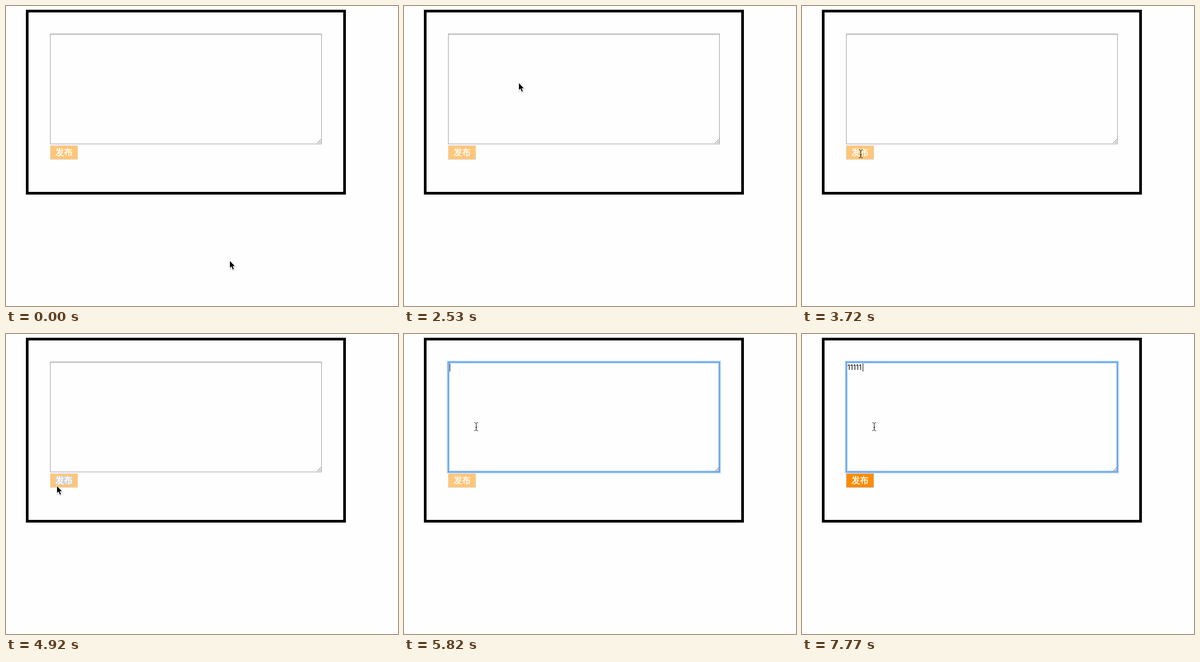
These frames come from a looping animation (730x560 px, 8 s). An HTML page:

```html
<!DOCTYPE html>
<html lang="zh">
<head>
<meta charset="utf-8">
<style>
  html, body { margin: 0; width: 100%; height: 100%; overflow: hidden; background: #fefefe; }
  svg { display: block; }
  .label { font: 500 16px "Noto Sans CJK SC", "Noto Sans CJK", sans-serif; fill: #fff; stroke: #fff; stroke-width: .4px; }
  .typed { font: 13px Inter, sans-serif; fill: #000; }
</style>
</head>
<body>
<svg width="730" height="560" viewBox="0 0 730 560" fill="none">
  <defs>
    <rect id="box" x="82.5" y="52.5" width="505" height="205"/>
    <path id="head" d="M0 0V12.8L2.9 10.1L5.2 15.8L7.3 14.9L5 9.4H9Z"/>
  </defs>
  <rect x="39.5" y="9.5" width="591" height="340" stroke="#000" stroke-width="5"/>

  <use href="#box" stroke="#a0a0a0"/>
  <path d="M82 52.5H588" stroke="#767676"/>
  <path d="M579.5 256l7-7M583.5 256l3-3" stroke="#555"/>
  <g id="ring" stroke="#4a96e8">
    <use href="#box" stroke-width="7" opacity=".1"/>
    <use href="#box" stroke-width="5" opacity=".2"/>
    <use href="#box" stroke-width="3" opacity=".5"/>
    <use href="#box"/>
  </g>
  <text id="typed" class="typed" x="84.5" y="67"></text>
  <path id="caret" d="M0 55V70" stroke="#000"/>

  <rect id="button" x="82.5" y="260.5" width="51" height="26"/>
  <rect id="selection" x="92" y="265" width="32" height="16" fill="#d4d0cd"/>
  <text class="label" x="92" y="279">发布</text>

  <g id="arrow">
    <use href="#head" x=".3" y="1.2" stroke="#000" stroke-width="3" opacity=".14"/>
    <use href="#head" stroke="#fff" stroke-width="2"/>
    <use href="#head" fill="#000"/>
  </g>
  <path id="beam" d="M-3 -7.5H-1.5L.5 -6L2.5 -7.5H4M.5 -6.5V6.5M-3 7.5H-1.5L.5 6L2.5 7.5H4M-1 1.5H2" stroke="#111"/>
</svg>
<script>
const LOOP = 8000;
const STEP = 150;
const SELECT_AT = 4170, FOCUS_AT = 5820, CARET_OFF_AT = 6270, TYPE_AT = 6870;
const CHAR_WIDTH = 5.7;

const el = id => document.getElementById(id);
const [ring, typed, caret, button, selection, arrow, beam] =
  ["ring", "typed", "caret", "button", "selection", "arrow", "beam"].map(el);

// Pointer moves: first step, last step, destination
const start = { x: 417, y: 476 };
const moves = [
  { from: 300, to: 880, x: 249, y: 155 },
  { from: 2530, to: 2680, x: 178, y: 133 },
  { from: 3120, to: 3720, x: 109, y: 276, beam: true },
  { from: 4620, to: 4920, x: 95, y: 284 },
  { from: 5370, to: FOCUS_AT, x: 134, y: 173, beam: true }
];

const ease = p => p * p * (3 - 2 * p);

function pointerAt(t) {
  const i = moves.findLastIndex(m => m.from <= t);
  if (i < 0) return start;
  const move = moves[i], origin = moves[i - 1] || start;
  if (t >= move.to) return move;
  const steps = Math.round((move.to - move.from) / STEP) + 1;
  const p = ease((Math.floor((t - move.from) / STEP) + 1) / steps);
  return {
    x: Math.round(origin.x + (move.x - origin.x) * p),
    y: Math.round(origin.y + (move.y - origin.y) * p)
  };
}

// Two characters in every three steps, five in all
function typedCount(t) {
  const steps = Math.floor((t - TYPE_AT) / STEP) + 1;
  return Math.max(0, Math.min(5, Math.ceil(steps * 2 / 3)));
}

function show(node, visible) {
  node.setAttribute("visibility", visible ? "visible" : "hidden");
}

function draw(t) {
  const pointer = pointerAt(t);
  show(arrow, !pointer.beam);
  show(beam, pointer.beam);
  (pointer.beam ? beam : arrow).setAttribute("transform", `translate(${pointer.x} ${pointer.y})`);

  const count = typedCount(t);
  typed.textContent = "1".repeat(count);
  caret.setAttribute("transform", `translate(${Math.floor(85 + count * CHAR_WIDTH) + 0.5} 0)`);
  show(caret, t >= FOCUS_AT && t < CARET_OFF_AT || count > 0);
  show(ring, t >= FOCUS_AT);
  show(selection, t >= SELECT_AT && t < FOCUS_AT);

  button.setAttribute("fill", count ? "#ff8c00" : "#ffc678");
  button.setAttribute("stroke", count ? "#c4c0bc" : "#e0dcd8");
}

function tick(now) {
  draw(now % LOOP);
  requestAnimationFrame(tick);
}
draw(0);
requestAnimationFrame(tick);
</script>
</body>
</html>
```
